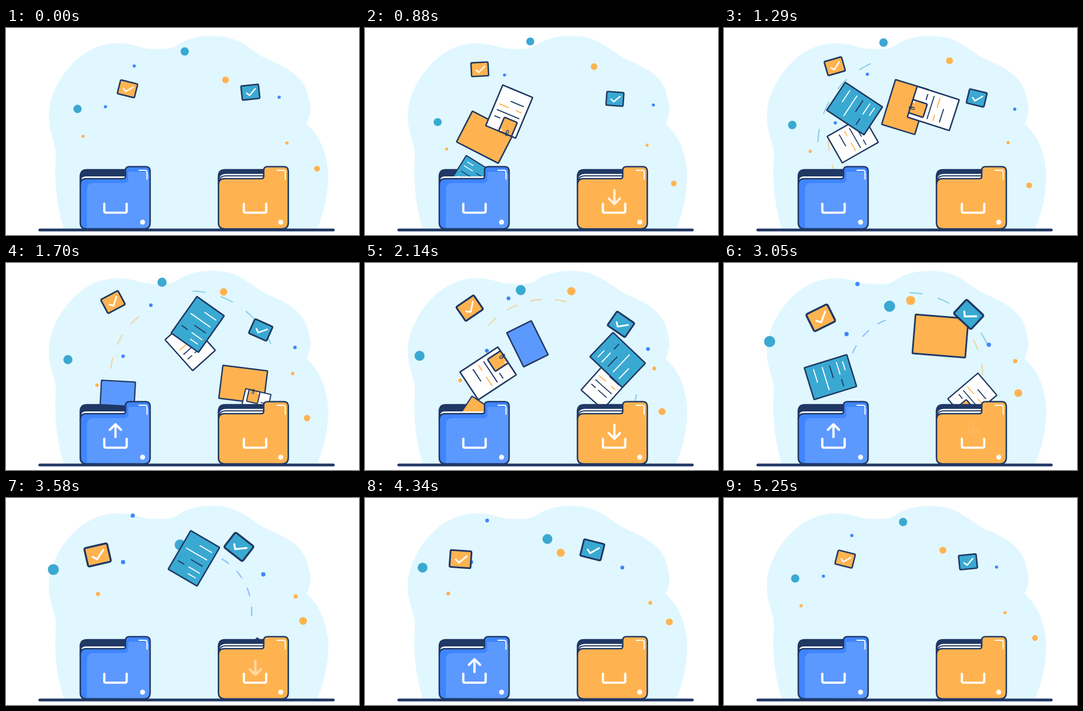
An HTML page that plays this animation: 632 px wide and 371 px high, repeating every 5.28 s.

```html
<!DOCTYPE html>
<html lang="en">
<head>
<meta charset="utf-8">
<title>File transfer</title>
<style>
  html, body { margin: 0; width: 100%; height: 100%; overflow: hidden; background: #fff; }
  svg { display: block; width: 632px; height: 371px; }
  .edge { stroke: #203864; stroke-width: 2.6; stroke-linejoin: round; }
  .line { fill: none; stroke-linecap: round; stroke-linejoin: round; }
  .white { stroke: #fff; }
  .navy { stroke: #203864; }
  .orange { stroke: #ffb350; }
  .icon { stroke: #fff; stroke-width: 4.2; opacity: .95; }
</style>
</head>
<body>
<svg viewBox="0 0 632 371">
  <defs>
    <clipPath id="sky"><rect width="632" height="254"/></clipPath>
    <path id="front" d="M133 281Q133 270 144 270H210Q214 270 214 266V255Q214 248.500 221 248.500H250Q258 248.500 258 257V349Q258 360 247 360H144Q133 360 133 349Z"/>
    <path id="back" d="M133 281V266Q133 254 145 254H216V281Z"/>
    <g id="shine">
      <path class="line white" stroke-width="2" d="M238 255H249Q252.500 255 252.500 259V271"/>
      <circle cx="244.500" cy="348" r="4.500" fill="#fff" opacity=".95"/>
    </g>
    <path id="tray" class="line icon" d="M176 315V328Q176 331 179 331H213Q216 331 216 328V315"/>

    <rect id="folder" class="edge" x="-42" y="-31" width="84" height="62" rx="1" fill="#ffb350"/>
    <rect id="sheet" class="edge" x="-34" y="-24.500" width="68" height="49" rx="1" fill="#5c99ff"/>
    <g id="report">
      <rect class="edge" x="-30" y="-40" width="60" height="80" rx="1" fill="#3aa9d2"/>
      <path class="line white" stroke-width="1.900" d="M-2-25H22M-21-9H21M0 18H22M5 29H20"/>
      <path class="line navy" stroke-width="1.900" d="M-3 4.500H20M-22 18H-10"/>
    </g>
    <g id="page">
      <rect class="edge" x="-29" y="-39.500" width="58" height="79" rx="1" fill="#fff"/>
      <path class="line navy" stroke-width="1.900" d="M-4-18H20M-21 5H21M-21 17H-11M-3 17H18"/>
      <path class="line orange" stroke-width="1.900" d="M-21-6H-4M11-6H21"/>
    </g>
    <g id="note">
      <use href="#page"/>
      <rect class="edge" x="-4" y="12.500" width="25" height="27" rx="2" fill="#ffb350"/>
      <circle cx="-.500" cy="36" r="1.800" fill="#fff"/>
      <path class="line navy" stroke-width="1.200" d="M9 40V34Q9 32 11 32T13 34V40Q13 42 11.500 42T10.500 40V36"/>
    </g>
    <g id="card">
      <rect class="edge" x="-15.500" y="-12.500" width="31" height="25" rx="2"/>
      <path class="line white" stroke-width="2.500" d="M-7 1L-2 5.500L9-5"/>
    </g>
  </defs>

  <path fill="#e0f7ff" d="M104 362C92 325 86 280 89 235C92 205 74 190 77 150C80 105 125 33 190 28C225 25 240 37 262 37.500C285 38 297 38 305 32C335 10 385 10 412 22C435 32 450 48 470 57C505 71 530 88 538 112C546 138 549 148 538 172C562 192 575 225 577 262C577 305 566 340 556 362Z"/>
  <g id="trails" clip-path="url(#sky)"></g>
  <g id="dots"></g>
  <use href="#back" class="edge" fill="#203864"/>
  <g id="papers"></g>

  <path d="M135 281V271Q136 266 144 266H214V281Z" fill="#fff"/>
  <use href="#front" fill="#3f85ff"/>
  <path d="M145 358V290Q145 278 157 278H212Q219 278 219 271V258H250L257 262V349Q257 359 247 359Z" fill="#5c99ff"/>
  <use href="#front" class="edge" fill="none"/>
  <use href="#shine"/>
  <use href="#tray"/>
  <path id="up" class="line icon" d="M196 312V289M186 299L196 289L206 299"/>

  <g transform="translate(247.400)">
    <use href="#back" class="edge" fill="#203864"/>
    <path d="M134 281V272Q135 261.500 146 261.500H213V281Z" fill="#fff"/>
    <path class="line navy" stroke-width="1.800" d="M134 275Q135 265 146 265H213"/>
    <use href="#front" class="edge" fill="#ffb350"/>
    <use href="#shine"/>
    <use href="#tray" x="2.500"/>
  </g>
  <path id="down" class="line icon" d="M446.500 290V315M436.500 305L446.500 315L456.500 305"/>

  <path class="line navy" stroke-width="5" d="M60.500 362H586"/>
  <g id="cards"></g>
</svg>
<script>
const LOOP = 5280;
const BEATS = [0, 880, 1700, 2580, 3580, 4340];
const ORANGE = '#ffb350', TEAL = '#3aa9d2', BLUE = '#3f85ff';
const $ = id => document.getElementById(id);
const clamp = (v, lo = 0, hi = 1) => Math.max(lo, Math.min(hi, v));
const rad = deg => deg * Math.PI / 180;

function add(parent, tag, attrs) {
  const el = document.createElementNS('http://www.w3.org/2000/svg', tag);
  for (const k in attrs) el.setAttribute(k, attrs[k]);
  return $(parent).appendChild(el);
}

const place = (el, x, y, r, s) =>
  el.setAttribute('transform', `translate(${x} ${y}) rotate(${r}) scale(${s})`);

// Once-per-loop wave around a middle value
function wave(t, mid, c, s) {
  const w = 2 * Math.PI * t / LOOP;
  return mid + c * Math.cos(w) + s * Math.sin(w);
}

// Drifting dots: colour, radius, then x and y waves
const dots = [
  [TEAL, 7.3, [303, 17, -18], [54, -12, -27.5]],
  [TEAL, 7.3, [107, 21, 14.5], [149, -4, 25]],
  [ORANGE, 6, [370, 23, 33], [75, 18, -17]],
  [ORANGE, 5.1, [542, 15, 4], [250, 2, 32]],
  [BLUE, 2.8, [239, -9.5, 18], [58, 10, 24.5]],
  [BLUE, 2.8, [200, -22, 0], [141, 0, 29]],
  [BLUE, 2.8, [489, 0, 31.5], [138, -14, 8]],
  [ORANGE, 2.8, [156, -18, -1], [195, -1, 26]],
  [ORANGE, 2.8, [512, -9, -3], [193, 13, 12]]
].map(([fill, r, x, y]) => ({ r, x, y, el: add('dots', 'circle', { fill }) }));

// Smooth closed curve through one key per beat
function loopCurve(keys, t) {
  const n = BEATS.length;
  const key = i => keys[(i + n) % n];
  const time = i => BEATS[(i + n) % n] + LOOP * Math.floor(i / n);
  let i = n - 1;
  while (t < BEATS[i]) i--;
  const h = time(i + 1) - time(i), u = (t - time(i)) / h, v = 1 - u;
  return key(i).map((from, k) => {
    const to = key(i + 1)[k];
    const m0 = (to - key(i - 1)[k]) / (time(i + 1) - time(i - 1)) * h;
    const m1 = (key(i + 2)[k] - from) / (time(i + 2) - time(i)) * h;
    return v * v * (1 + 2 * u) * from + u * v * v * m0 + u * u * (3 - 2 * u) * to - u * u * v * m1;
  });
}

// Cards: x, y, turn
const cards = [
  [ORANGE, [[217.5, 109, 14], [205.5, 74, -3], [191.5, 70, -28], [183, 93, -35], [164, 102, -13], [171, 109.5, 4]]],
  [TEAL, [[437.5, 115, -6], [447.5, 127, 4], [456, 120, 24], [455, 99.5, 42], [417, 87.5, 38], [407, 93, 14]]]
].map(([fill, keys]) => ({ keys, el: add('cards', 'use', { href: '#card', fill }) }));

// Papers swing from folder to folder. At time t the paper is at angle a (0 left, 90 top)
// moving by speed degrees per ms; spin is its turn per degree of swing.
const papers = [
  { kind: 'folder', t: 880, a: 16.2, speed: .195, cx: 315, r: 83.7, turn: 27, spin: 1 },
  { kind: 'folder', t: 2580, a: 46.9, speed: .16, cx: 328, r: 107, turn: -27, spin: .42, size: 1.13 },
  { kind: 'sheet', t: 1700, a: -4.6, speed: .181, cx: 312, r: 82, turn: 3, spin: .76 },
  { kind: 'page', t: 1700, a: 92.6, speed: .19, cx: 326, r: 78, turn: -42, spin: 1, size: .94 },
  { kind: 'note', t: 880, a: 49.5, speed: .179, cx: 322, r: 92, turn: 22.5, spin: 1.16 },
  { kind: 'note', t: 2580, a: 97.8, speed: .19, cx: 326, r: 88, turn: -40, spin: 1, size: 1.03 },
  { kind: 'report', t: 1700, a: 96.4, speed: .138, cx: 330, r: 115.5, turn: 35, spin: 1.62 },
  { kind: 'report', t: 3580, a: 93, speed: .16, cx: 330, r: 117, turn: 30, spin: 1.62 }
].map(p => ({ size: 1, ...p, el: add('papers', 'use', { href: '#' + p.kind }) }));

// Dashed arcs swing the same way
const trails = [
  { color: TEAL, t: 1700, a: 124, speed: .22, cx: 328, cy: 210, r: 160 },
  { color: TEAL, t: 2580, a: 20, speed: .22, cx: 328, cy: 210, r: 157 },
  { color: ORANGE, t: 1700, a: 19, speed: .122, cx: 325, cy: 203, r: 138 },
  { color: BLUE, t: 3580, a: 152, speed: .22, cx: 331, cy: 203, r: 109 }
].map(d => ({ ...d, el: add('trails', 'circle', {
  cx: d.cx, cy: d.cy, r: d.r, stroke: d.color, fill: 'none', 'stroke-width': 2.2, opacity: .5,
  pathLength: 360, 'stroke-dasharray': '8.5 10 8.5 10 8.5 10 8.5 296'
}) }));

// Angle at time now; hides the part once it is past either end
function swing({ el, t, a, speed }, now, margin) {
  const angle = a + speed * (now - t);
  el.style.display = angle > -margin && angle < 180 + margin ? '' : 'none';
  return angle;
}

function drawPaper(p, now) {
  const angle = swing(p, now, 40);
  const lift = Math.sin(rad(angle));
  const r = p.r + 28 * (1 - lift);
  place(p.el, p.cx - r * Math.cos(rad(angle)), 225 - r * lift,
    p.turn + p.spin * (angle - p.a), p.size * clamp(.93 + .45 * lift, .7, 1));
}

function arrow(id, p, start, dir) {
  const fade = 170, hold = 285;
  const rise = clamp((p - start) / fade);
  const fall = clamp((p - start - fade - hold) / fade);
  $(id).style.opacity = .95 * Math.min(rise, 1 - fall);
  $(id).setAttribute('transform', `translate(0 ${dir * ((rise - 1) * 8 + fall * 4)})`);
}

function draw(t) {
  const size = wave(t, 1.17, -.155, -.125);
  for (const { el, r, x, y } of dots) {
    place(el, wave(t, ...x), wave(t, ...y), 0, 1);
    el.setAttribute('r', r * size);
  }
  for (const { el, keys } of cards) place(el, ...loopCurve(keys, t), size);
  for (const p of papers) drawPaper(p, t);
  for (const d of trails) {
    d.el.setAttribute('transform', `rotate(${swing(d, t, 60) + 148} ${d.cx} ${d.cy})`);
  }
  arrow('up', t % 1320, 180, -1);
  arrow('down', t % 1320, 400, 1);
}

const start = performance.now();
function tick() {
  draw((performance.now() - start) % LOOP);
  requestAnimationFrame(tick);
}
tick();
</script>
</body>
</html>
```
